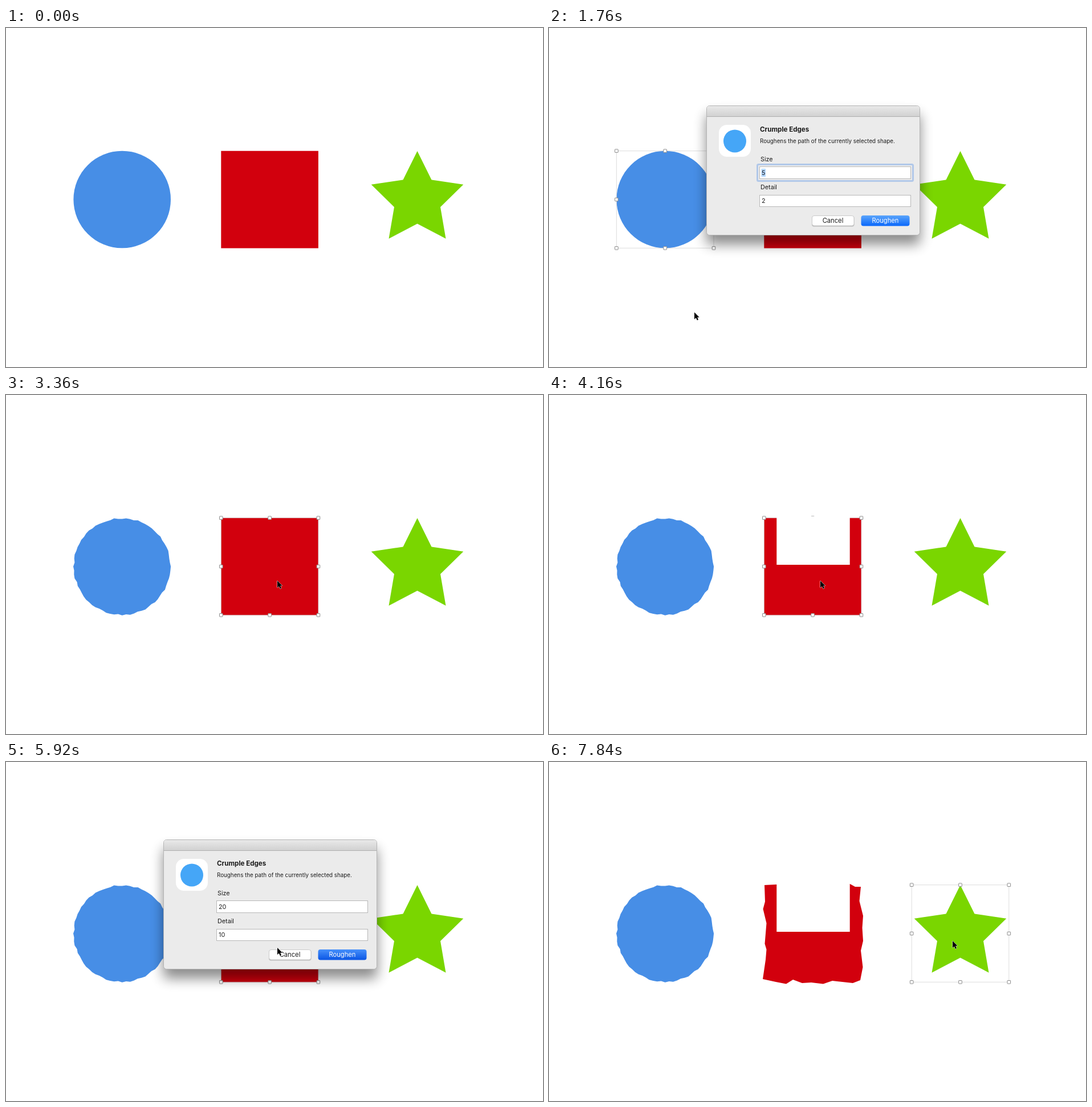
An HTML page for the animation above (8 s loop, 942 by 595 pixels).

```html
<!DOCTYPE html>
<html lang="en">
<head>
<meta charset="utf-8">
<title>Rough edges</title>
<style>
  html, body { margin: 0; width: 100%; height: 100%; overflow: hidden; background: #fff; }
  svg { display: block; width: 100%; height: 100%; }
  text { font: 10.8px Inter, "Open Sans", sans-serif; fill: #1c1c1c; }
  .title { font-size: 11.6px; font-weight: 700; }
  .info { font-size: 9.8px; }
  .button { font-size: 11.2px; text-anchor: middle; }
  .field { fill: #fff; stroke: #b8b8b8; }
  .handle { fill: #fff; stroke: #8c8c8c; }
</style>
</head>
<body>
<svg viewBox="0 0 942 595" xmlns="http://www.w3.org/2000/svg">
  <defs>
    <linearGradient id="bar" x2="0" y2="1">
      <stop stop-color="#e9e9e9"/><stop offset="1" stop-color="#d1d1d1"/>
    </linearGradient>
    <linearGradient id="blue" x2="0" y2="1">
      <stop stop-color="#5ba5fb"/><stop offset="1" stop-color="#0967fb"/>
    </linearGradient>
    <linearGradient id="pressed" x2="0" y2="1">
      <stop stop-color="#4690fb"/><stop offset="1" stop-color="#0a55e4"/>
    </linearGradient>
    <filter id="blur" x="-20%" y="-30%" width="140%" height="160%">
      <feGaussianBlur stdDeviation="11"/>
    </filter>
  </defs>

  <circle id="disc" cx="203.7" cy="301" r="85.3" fill="#478ee6"/>
  <path id="roughDisc" fill="#478ee6"/>
  <path id="square" d="M377.3 215.8h170.6v170.6h-170.6z" fill="#d2000d"/>
  <path id="roughSquare" fill="#d2000d" d="M378 216L399 215L463 216L528 214L537 219L547 219L544.5 244L551 270L549.5 291L551 314L547 331L550.5 360L546 383L533 388L497 384L481 389.5L460 387L444 388L428 382L416 389.5L398 386L375 381L380 347L381.5 329L378.5 319L381.5 283L375.5 258L379 245Z"/>
  <path id="star" fill="#7ad600"/>
  <g id="selection"></g>

  <path id="popup" d="M399.3 213h128.4v85h-128.4z" fill="#fff"/>
  <g id="dialog">
    <rect x="276" y="152" width="375" height="228" rx="6" opacity=".45" filter="url(#blur)"/>
    <rect x="276.5" y="136.5" width="374" height="227" rx="5" fill="#ebebeb" stroke="#b4b4b4"/>
    <path d="M277 155V141q0-4 4-4H646q4 0 4 4V155z" fill="url(#bar)"/>
    <path d="M277 155.5H650" stroke="#b0b0b0"/>
    <rect x="298" y="170" width="56" height="56" rx="14" fill="#fff"/>
    <circle cx="326" cy="198.500" r="20" fill="#45a6f7"/>
    <text class="title" x="370" y="182">Crumple Edges</text>
    <text class="info" x="370" y="201.500">Roughens the path of the currently selected shape.</text>
    <text x="371" y="233.500">Size</text>
    <text x="371" y="283">Detail</text>
    <rect class="field" x="369.500" y="243.500" width="265" height="21"/>
    <rect class="field" x="369.500" y="293.500" width="265" height="20"/>
    <rect id="ring" fill="none" stroke="#78a6e8" stroke-width="3" rx="2"/>
    <rect id="mark" x="372.500" width="7.500" height="14" fill="#b3d7ff"/>
    <text id="size" x="373" y="257.800"></text>
    <text id="detail" x="373" y="307.300"></text>
    <rect x="461" y="330" width="74.500" height="18.500" rx="4" fill="#b5b5b5"/>
    <rect x="461.500" y="329.500" width="73.500" height="17.500" rx="3.500" fill="#fff" stroke="#cbcbcb"/>
    <text class="button" x="498" y="342.200">Cancel</text>
    <rect id="ok" x="547.500" y="329" width="85" height="18.500" rx="4"/>
    <text class="button" x="590" y="342.200" style="fill:#fff">Roughen</text>
  </g>
  <path id="cursor" d="M0 0V12.200L2.800 9.600L4.800 14L7 13L5.100 8.700H8.700Z" fill="#000" stroke="#fff" stroke-width="1" paint-order="stroke"/>
</svg>
<script>
const LOOP = 8000, STEP = 160;
const $ = id => document.getElementById(id);
const show = (id, on) => $(id).setAttribute('display', on ? 'inline' : 'none');
const set = (id, attrs) => {
  for (const key in attrs) $(id).setAttribute(key, attrs[key]);
};
const within = (t, a, b) => t >= a && t < b;

// Closed polygon around a centre, radius given per corner
function polygon(cx, cy, count, radius) {
  let d = '';
  for (let i = 0; i < count; i++) {
    const a = i / count * 2 * Math.PI - Math.PI / 2, r = radius(i);
    d += `${i ? 'L' : 'M'}${(cx + r * Math.cos(a)).toFixed(1)} ${(cy + r * Math.sin(a)).toFixed(1)}`;
  }
  return d + 'Z';
}

let seed = 11;
const random = () => (seed = seed * 16807 % 2147483647) / 2147483647;

set('star', { d: polygon(721.5, 301, 10, i => i % 2 ? 42.6 : 85) });
set('roughDisc', { d: polygon(203.7, 301, 76, () => 83.6 + random() * 2.4) });

// Selection frame: outline with eight handles, centred on 0,0
const R = 85.3;
let frame = `<path d="M${-R} ${-R}H${R}V${R}H${-R}Z" fill="none" stroke="#cfcfcf" stroke-opacity=".7"/>`;
for (const x of [-1, 0, 1]) {
  for (const y of [-1, 0, 1]) {
    if (x || y) frame += `<rect class="handle" x="${x * R - 2.8}" y="${y * R - 2.8}" width="5.6" height="5.6" rx=".5"/>`;
  }
}
$('selection').innerHTML = frame;

// Pointer stops: time, x, y
const stops = [
  [160, 337, 395], [320, 264, 340], [480, 216, 318], [640, 216, 318],
  [800, 221, 350], [960, 235, 430], [1120, 246, 495], [1280, 255, 499],
  [2880, 255, 499], [3040, 330, 440], [3200, 440, 353], [3360, 476, 326],
  [6400, 476, 326], [6560, 530, 322], [6720, 630, 316], [6880, 698, 313], [7040, 708, 314]
];
function pointer(t) {
  const i = stops.findIndex(s => s[0] > t);
  if (i < 0) return stops[stops.length - 1].slice(1);
  if (!i) return null;
  const [t0, x0, y0] = stops[i - 1], [t1, x1, y1] = stops[i];
  const k = (t - t0) / (t1 - t0);
  return [x0 + (x1 - x0) * k, y0 + (y1 - y0) * k];
}

function selectedX(t) {
  if (within(t, 640, 2880)) return 203.7;
  if (within(t, 3360, 6400)) return 462.6;
  return t >= 7040 ? 721.5 : null;
}

function drawDialog(t) {
  const first = t < 2560;
  const open = within(t, 1760, 2560) || within(t, 4320, 6080);
  const pressed = within(t, 2400, 2560) || within(t, 5920, 6080);
  const onDetail = within(t, 5280, 5920);
  show('dialog', open);
  show('popup', [1600, 4160, 7840].includes(t));
  if (!open) return;

  $('size').textContent = first || t < 4800 ? '5' : t < 4960 ? '2' : '20';
  $('detail').textContent = first || t < 5600 ? '2' : t < 5760 ? '1' : '10';
  set('ok', { fill: pressed ? 'url(#pressed)' : 'url(#blue)' });

  // The ring settles from a slightly wider outline
  const grow = [1760, 4320, 5280].includes(t) ? 3 : 0;
  const top = onDetail ? 293 : 243;
  show('ring', !pressed);
  set('ring', {
    x: 368.5 - grow, y: top - 0.5 - grow,
    width: 267 + grow * 2, height: (onDetail ? 22 : 23) + grow * 2,
    opacity: grow ? 0.5 : 1
  });
  show('mark', !pressed && (first || t < 4800 || within(t, 5280, 5600)));
  set('mark', { y: top + 4 });
}

function draw(now) {
  const t = Math.floor(now % LOOP / STEP) * STEP;
  const discRough = t >= 2880, squareRough = t >= 6400;
  show('disc', !discRough);
  show('roughDisc', discRough);
  show('square', !squareRough);
  show('roughSquare', squareRough);

  const x = selectedX(t);
  show('selection', x !== null);
  if (x !== null) set('selection', { transform: `translate(${x} 301)` });

  drawDialog(t);

  const p = pointer(t);
  show('cursor', p);
  if (p) set('cursor', { transform: `translate(${p[0]} ${p[1]})` });
}

let start = null;
function tick(now) {
  if (start === null) start = now;
  draw(now - start);
  requestAnimationFrame(tick);
}
draw(0);
requestAnimationFrame(tick);
</script>
</body>
</html>
```
